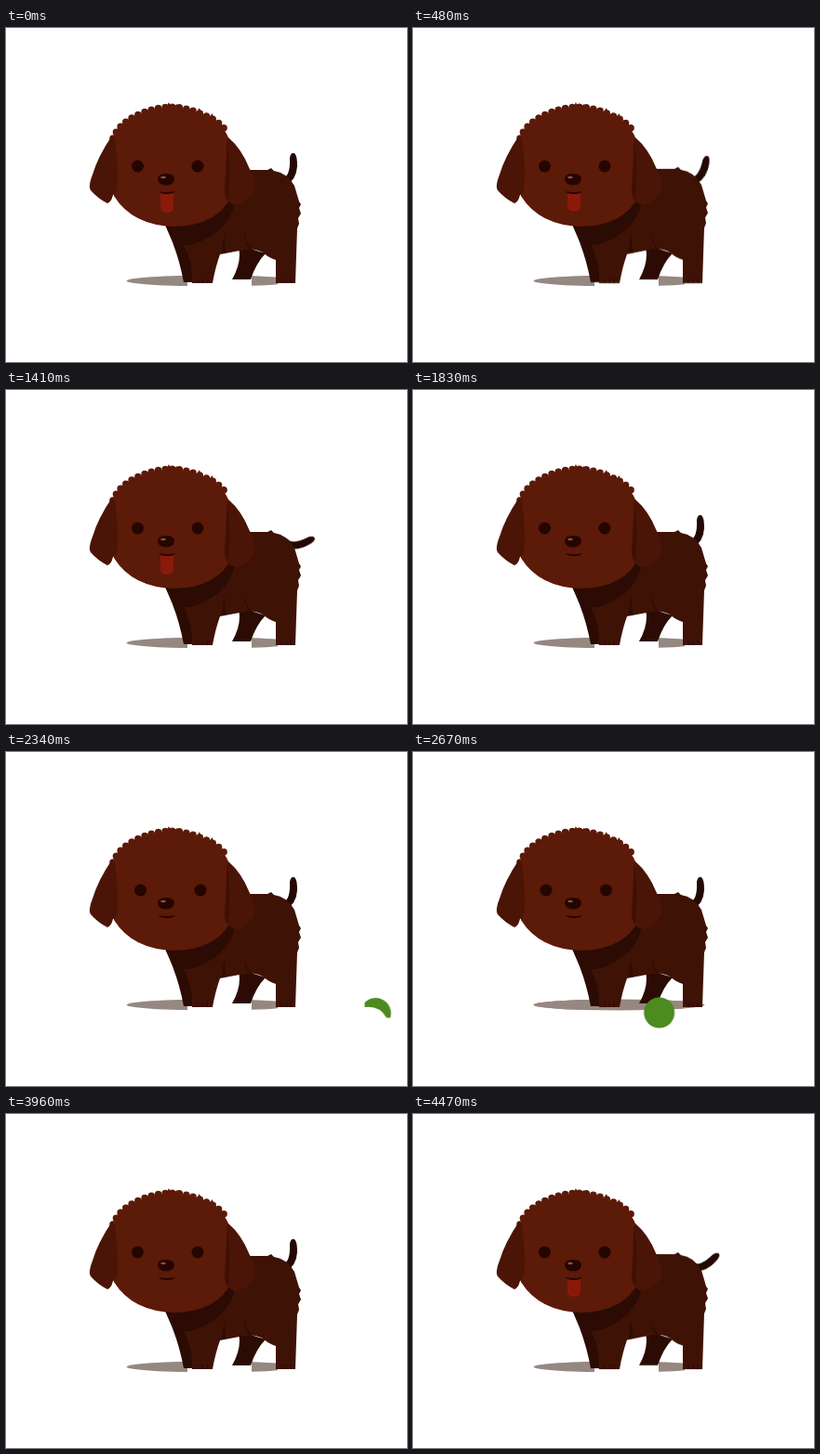
These frames come from a looping animation (431x360 px, 4500 ms). An HTML page without scripts:

```html
<!DOCTYPE html>
<html lang="en">
<head>
<meta charset="utf-8">
<title>Puppy and ball</title>
<style>
  html, body { margin: 0; width: 100%; height: 100%; overflow: hidden; background: #fff; }
  svg { display: block; width: 100vw; height: 100vh; }

  .tail, .body, .tongue, .eyes, .ball, .glint, .disc, .wide-shadow {
    animation: 4.5s infinite;
  }
  .tail {
    transform-origin: 301px 165px;
    animation-name: wag;
    animation-timing-function: cubic-bezier(.37, 0, .63, 1);
  }
  .body {
    transform-origin: 250px 275px;
    animation-name: breathe;
    animation-timing-function: ease-in-out;
  }
  .tongue {
    transform-origin: 173px 178px;
    animation-name: pant;
    animation-timing-function: ease-in-out;
  }
  .eyes { animation-name: look; animation-timing-function: linear; }
  .ball { animation-name: roll; animation-timing-function: linear; }
  .glint { animation-name: arrive; animation-timing-function: step-end; }
  .disc, .wide-shadow { animation-name: present; animation-timing-function: step-end; }

  @keyframes wag {
    0%, 9.333%, 18.667%, 28%, 37.333% { transform: rotate(0deg); }
    4.667%, 14%, 23.333%, 32.667% { transform: rotate(80deg); }
    96.667% { transform: rotate(0deg); animation-timing-function: cubic-bezier(.4, 0, .7, .65); }
    100% { transform: rotate(65deg); }
  }
  @keyframes breathe {
    0%, 6.222%, 12.444%, 18.667%, 24.889%, 31.111%, 37.333%, 96.667% { transform: scaleY(1); }
    3.111%, 9.333%, 15.556%, 21.778%, 28%, 34.222%, 99.778%, 100% { transform: scaleY(1.016); }
  }
  @keyframes pant {
    0%, 6.222%, 12.444%, 18.667%, 24.889%, 31.111%, 37.333%, 96.667% { transform: scaleY(1); }
    3.111%, 9.333%, 15.556%, 21.778%, 28%, 34.222%, 99.778%, 100% { transform: scaleY(.9); }
    39.333%, 94.667% { transform: scaleY(0); }
  }
  @keyframes look {
    0%, 48.667% { transform: translateX(0); }
    51.333%, 53.333% { transform: translateX(3px); }
    59.333% { transform: translateX(1.5px); }
    68.333%, 75.5% { transform: translateX(-2px); }
    79%, 100% { transform: translateX(0); }
  }
  @keyframes roll {
    0%, 51.333% { transform: translate(410px, 281px); }
    68.333%, 100% { transform: translate(102px, 281px); }
  }
  @keyframes arrive {
    0% { opacity: 0; }
    51.333% { opacity: 1; }
    52.6%, 100% { opacity: 0; }
  }
  @keyframes present {
    0% { opacity: 0; }
    52.6% { opacity: 1; }
    68.4%, 100% { opacity: 0; }
  }
</style>
</head>
<body>
<svg viewBox="0 0 431 360" preserveAspectRatio="none">
  <defs>
    <clipPath id="shadow-ends">
      <path d="M125 262h70v18h-70zM264 262h28v18h-28z"/>
    </clipPath>
    <ellipse id="shadow" cx="221.5" cy="272.5" rx="92" ry="6"/>
  </defs>

  <g fill="#958880">
    <use href="#shadow" clip-path="url(#shadow-ends)"/>
    <use href="#shadow" class="wide-shadow"/>
  </g>

  <path class="tail" fill="#230804"
    d="M297 162Q306 160 305 140Q306 134 310 135Q313 137 313 149Q312 164 301 169Z"/>

  <g class="body">
    <g fill="#2b0b03">
      <path d="M171 212L205 222L201 274H191Q187 252 179 231Z"/>
      <path d="M250 234L279 243Q269 253 263 271H243Q251 257 251 244Z"/>
    </g>
    <path fill="#3f1206"
      d="M190 232L235 165L262 153H281L285 151L288 154Q302 156 310 170L315 187
         L317 190L315 194L317 200L314 205L315 211L313 216L311 275H290V250
         Q283 248 276 242Q266 236 251 240L230 244Q225 258 222 275H200Q201 252 190 232Z"/>
    <path fill="#2b0b03"
      d="M171 212Q210 214 238 184L247 183Q243 212 217 226Q200 236 189 234L179 229Z"/>
    <g fill="#2e0c04">
      <path d="M236 221Q232 232 232 243L237 242Q234 233 236 221Z"/>
      <path d="M257 220Q257 236 268 240L262 238Q255 232 257 220Z"/>
    </g>
    <path fill="none" stroke="#260903" d="M206 270v5M211 271v4M216 270v5M296 270v5M301 271v4M306 270v5"/>
  </g>

  <g fill="#5c1a08">
    <path d="M114 122Q120 104 144 93Q176 79 209 92Q232 101 239 118L243 180
      Q228 213 181 214Q136 213 116 181Z"/>
    <path fill="none" stroke="#5c1a08" stroke-width="7.5" stroke-linecap="round" stroke-dasharray="0 7.6"
      d="M115 119Q121 103 143 93Q176 78 208 92Q228 99 236 110"/>
    <path d="M172 86L175 80L178 86L184 82L184 89ZM204 92L208 86L210 93ZM218 96L222 92L223 99Z"/>
  </g>

  <g fill="#4a1506">
    <path d="M114 116Q99 138 93 158Q88 171 91 175Q99 184 109 189Q113 188 115 180Q121 179 120 153Q119 133 117 119Z"/>
    <path d="M239 118Q253 130 261 150Q270 167 267 176Q259 190 246 191Q236 188 235 176Q237 147 237 122Z"/>
  </g>
  <path fill="#3d1005" d="M238 124Q242 150 239 186Q235 181 235 174Q237 150 238 124Z"/>

  <path class="tongue" fill="#8b1909" d="M166 178H180V194Q179 199 173 199Q166 199 166 193Z"/>
  <path fill="#250500" d="M164 176Q173 178 182 176Q180 179 173 179Q166 179 164 176Z"/>

  <g class="eyes" fill="#250500">
    <circle cx="141.5" cy="149" r="6.5"/>
    <circle cx="206" cy="149" r="6.5"/>
  </g>
  <path fill="#250500" d="M163 163Q163 157 172 157Q181 157 181 163Q180 169 172 169.500Q164 169 163 163Z"/>
  <ellipse cx="169" cy="161" rx="2.800" ry="1.200" fill="#82544a"/>

  <g class="ball" fill="#4d8a20">
    <path class="glint" d="M-12 -11A16.500 16.500 0 0 1 15.500 5.500H11.500Q4 -8 -12 -6Z"/>
    <circle class="disc" r="16.500"/>
  </g>
</svg>
</body>
</html>
```
